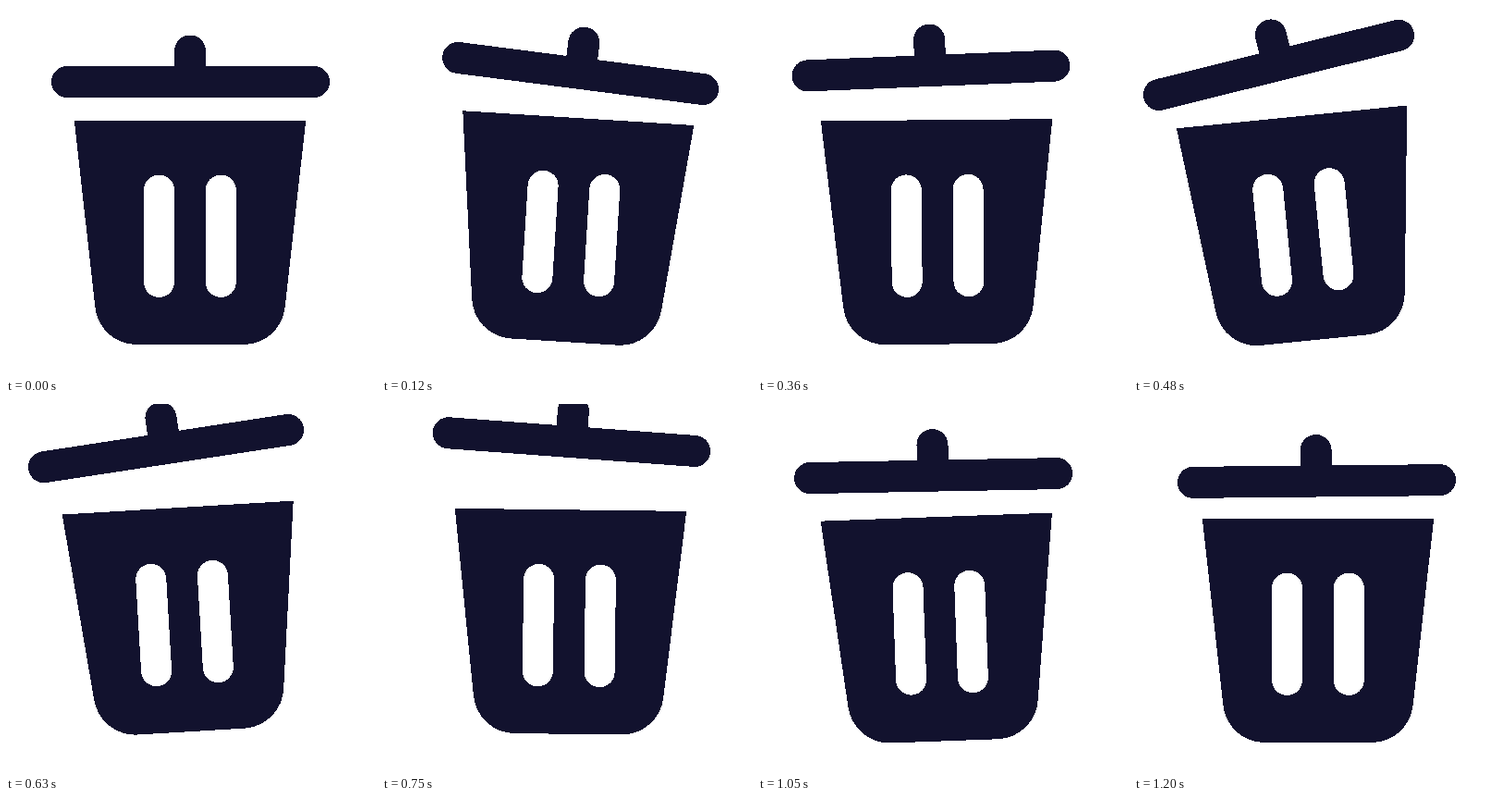
An HTML page for the animation above (1230 ms loop, 400 by 400 pixels).

```html
<!DOCTYPE html>
<html lang="en">
<head>
<meta charset="utf-8">
<title>Hopping bin</title>
<style>
  html, body { margin: 0; width: 100%; height: 100%; overflow: hidden; background: #fff; }
  svg { display: block; width: 100vw; height: 100vh; shape-rendering: crispEdges; }
  .ink { fill: #12122e; }
  .line { fill: none; stroke: #12122e; stroke-width: 34; stroke-linecap: round; }
  .slot { stroke: #fff; stroke-width: 33; }
</style>
</head>
<body>
<svg viewBox="0 0 400 400">
  <g id="body">
    <path class="ink" d="M73.8 123.6H324.2L301.7 325.2A45 45 0 0 1 257 366H141A45 45 0 0 1 96.3 325.2Z"/>
    <path class="line slot" d="M165.5 199V298.5M232.3 199V298.5"/>
  </g>
  <g id="lid">
    <path class="line" d="M66 82H333M199 48.5V82"/>
  </g>
</svg>
<script>
const LOOP = 1230, STEP = 30;
const RIGHT = 200, LEFT = 510;   // turning points of the first two swings

// Cosine easing from rest through each turning point [time, value]
const swing = (...turns) => t => {
  let [t0, v0] = [0, 0];
  for (const [t1, v1] of turns) {
    if (t < t1) return v0 + (v1 - v0) * (1 - Math.cos(Math.PI * (t - t0) / (t1 - t0))) / 2;
    [t0, v0] = [t1, v1];
  }
  return v0;
};

// Height of a ballistic jump between take-off and landing
const hop = (t, from, to, height) => {
  const u = (t - from) / (to - from);
  return u > 0 && u < 1 ? 4 * height * u * (1 - u) : 0;
};

const tilt = swing([RIGHT, 5.5], [LEFT, -5.95], [810, 1.4], [1050, -2.07], [1200, 0]);
const bin = {
  el: document.getElementById('body'),
  pivot: '199 248.7',
  angle: tilt,
  x: swing([RIGHT, 8.3], [LEFT, -16.6], [740, 3.5], [1050, -1.7], [1200, 0]),
  // rocking on a corner lifts the middle
  y: t => -0.75 * Math.abs(tilt(t)) - hop(t, 520, 850, 10.3)
};

const lid = {
  el: document.getElementById('lid'),
  pivot: '199.5 82',
  angle: swing([RIGHT, 11.2], [LEFT, -14.5], [920, 15.1], [1065, -1.5], [1300, 0]),
  x: swing([RIGHT, 23], [LEFT, -44.6], [830, 14], [1060, -10], [1260, 0]),
  y: swing([220, -15.8], [355, -12], [765, -41], [1060, -4.3], [1200, 1.5], [LOOP, 0])
};

const start = performance.now();

function draw() {
  const t = Math.floor((performance.now() - start) % LOOP / STEP) * STEP;
  for (const { el, pivot, angle, x, y } of [bin, lid]) {
    el.setAttribute('transform', `translate(${x(t)} ${y(t)}) rotate(${angle(t)} ${pivot})`);
  }
  requestAnimationFrame(draw);
}
draw();
</script>
</body>
</html>
```
